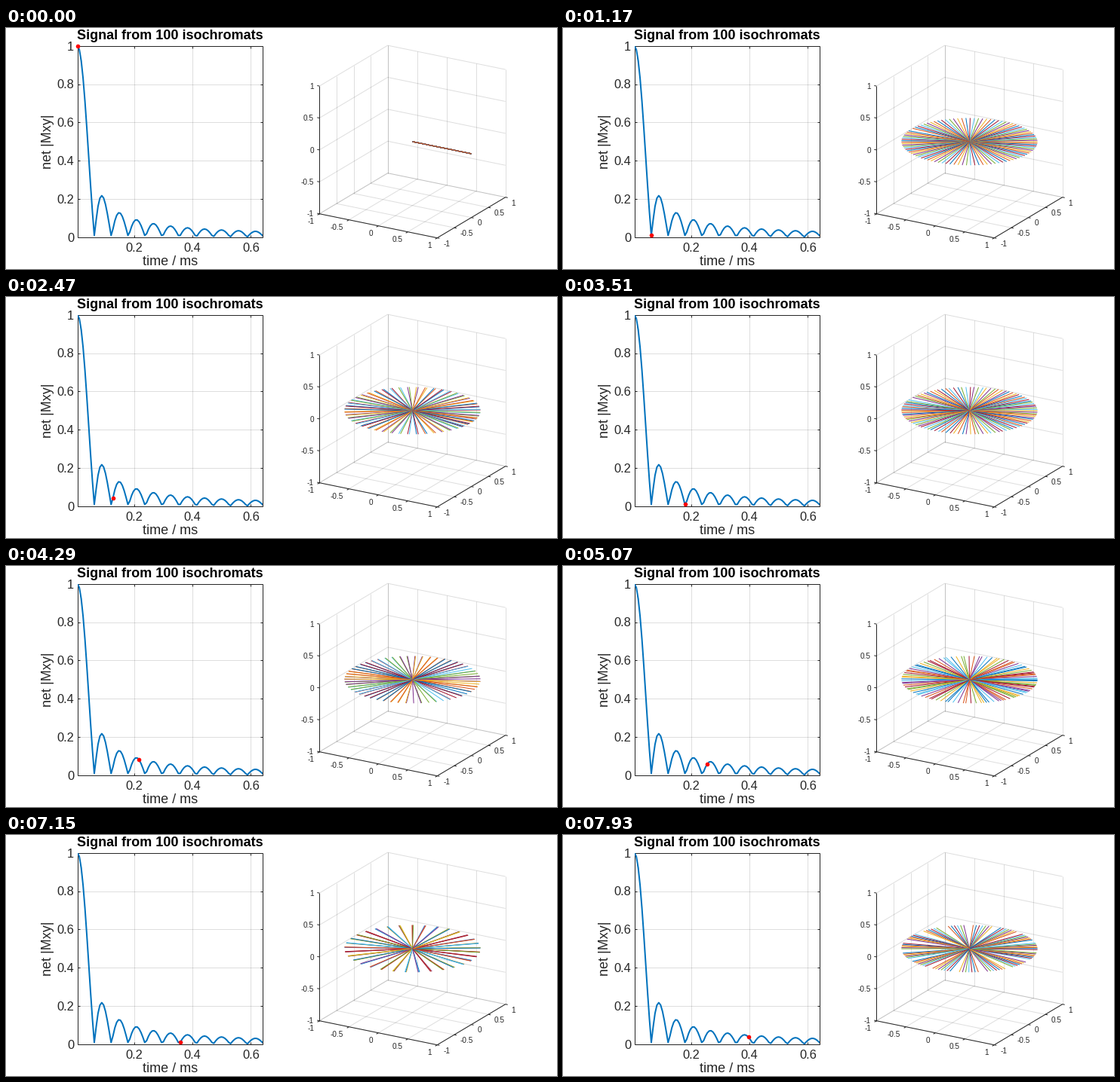
A matplotlib script that plays this animation: 730x320 px, repeating every 8000 ms.

```python
import numpy as np
import matplotlib.pyplot as plt
from matplotlib.animation import FuncAnimation
from matplotlib.collections import LineCollection
from matplotlib.patches import Rectangle

plt.rcParams["font.family"] = "Liberation Sans"

W, H, DPI = 730, 320, 100
PX = 72 / DPI                     # points per pixel
FRAMES, LOOP_MS = 62, 8000
DARK = "#262626"
COLORS = ["#0072BD", "#D95319", "#EDB120", "#7E2F8E",
          "#77AC30", "#4DBEEE", "#A2142F"]

# Dephasing of evenly spread isochromats
N, STEPS = 100, 100
DT = 0.0064                       # ms
BANDWIDTH = 17.032                # kHz
freqs = np.linspace(-BANDWIDTH / 2, BANDWIDTH / 2, N)
phases = 2 * np.pi * np.outer(np.arange(STEPS) * DT, freqs)
time = DT * np.arange(1, STEPS + 1)
signal = np.abs(np.exp(1j * phases).mean(axis=1))

fig = plt.figure(figsize=(W / DPI, H / DPI), dpi=DPI, facecolor="white")
ax = fig.add_axes([0, 0, 1, 1])
ax.set(xlim=(0, W), ylim=(H, 0))
ax.axis("off")


def line(p, q, color=DARK, width=1.0, **kw):
    ax.plot([p[0], q[0]], [p[1], q[1]], color=color, lw=width * PX,
            solid_capstyle="butt", **kw)


def label(x, y, text, size, ha="center", va="baseline", color=DARK, **kw):
    ax.text(x, y, text, fontsize=size * PX, ha=ha, va=va, color=color, **kw)


def grid(p, q):
    line(p, q, alpha=0.15, zorder=1)


# ---- Signal plot ----
L, R, T, B = 94.7, 339.7, 23.7, 277.8


def plot_xy(t, s):
    x = L + (t - time[0]) / (time[-1] - time[0]) * (R - L)
    return x, B - s * (B - T)


for t in (0.2, 0.4, 0.6):
    x, _ = plot_xy(t, 0)
    grid((x, T), (x, B))
    line((x, B), (x, B - 3))
    line((x, T), (x, T + 3))
    label(x + 0.3, 296.8, f"{t:g}", 16.4)

for s in (0, 0.2, 0.4, 0.6, 0.8, 1):
    _, y = plot_xy(0, s)
    if 0 < s < 1:
        grid((L, y), (R, y))
        line((L, y), (L + 3, y))
        line((R, y), (R - 3, y))
    label(90, y + 5.8, f"{s:g}", 16.4, ha="right")

box = Rectangle((L, T), R - L, B - T, fill=False, ec=DARK, lw=PX, zorder=2)
ax.add_patch(box)
label(217.3, 15.3, "Signal from 100 isochromats", 18, color="black",
      weight="bold")
label(217.3, 314.8, "time / ms", 18)
label(60.3, 151, "net |Mxy|", 18, ha="right", va="center", rotation=90,
      rotation_mode="default") if False else ax.text(
    60.3, 151, "net |Mxy|", fontsize=18 * PX, color=DARK, rotation=90,
    rotation_mode="anchor", ha="center", va="baseline")

curve, = ax.plot(*plot_xy(time, signal), color=COLORS[0], lw=2 * PX, zorder=3)
curve.set_clip_path(box)
dot, = ax.plot([], [], "o", color="red", ms=5.6 * PX, mew=0, zorder=4)

# ---- 3D view ----
ORIGIN = np.array([538.5, 150.9])
AXES = np.array([[78, 16], [45.2, -27], [0, -84.8]])


def project(x, y, z):
    return ORIGIN + np.array([x, y, z]) @ AXES


for v in (-1, -0.5, 0, 0.5, 1):
    grid(project(v, -1, -1), project(v, 1, -1))
    grid(project(-1, v, -1), project(1, v, -1))
    grid(project(v, 1, -1), project(v, 1, 1))
    grid(project(-1, v, -1), project(-1, v, 1))
    grid(project(-1, 1, v), project(1, 1, v))
    grid(project(-1, -1, v), project(-1, 1, v))

    px, py, pz = project(v, -1, -1), project(1, v, -1), project(-1, -1, v)
    line(px, px + [-2.6, 1.6])
    line(py, py + [3, 0.6])
    line(pz, pz + [-3, -0.6])
    text = f"{v:g}"
    small = dict(size=10, va="center_baseline")
    label(px[0] - 7, px[1] + 8.8, text, ha="right", **small)
    label(py[0] + 8, py[1] + 6.8, text, ha="left", **small)
    label(pz[0] - 7.5, pz[1] - 0.3, text, ha="right", **small)

corner = project(-1, -1, -1)
line(corner, project(-1, -1, 1), zorder=2)
line(corner, project(1, -1, -1), zorder=2)
line(project(1, -1, -1), project(1, 1, -1), zorder=2)

spokes = LineCollection([], colors=[COLORS[i % 7] for i in range(N)],
                        linewidths=PX, zorder=3)
ax.add_collection(spokes, autolim=False)


def draw(k):
    x, y = plot_xy(time[k], signal[k])
    dot.set_data([x], [y])
    unit = np.column_stack([np.cos(phases[k]), np.sin(phases[k])])
    tips = ORIGIN + unit @ AXES[:2]
    spokes.set_segments([(ORIGIN, tip) for tip in tips])
    return dot, spokes


anim = FuncAnimation(fig, draw, frames=FRAMES, interval=LOOP_MS / FRAMES,
                     init_func=lambda: draw(0), repeat=True, repeat_delay=0)
plt.show()
```
